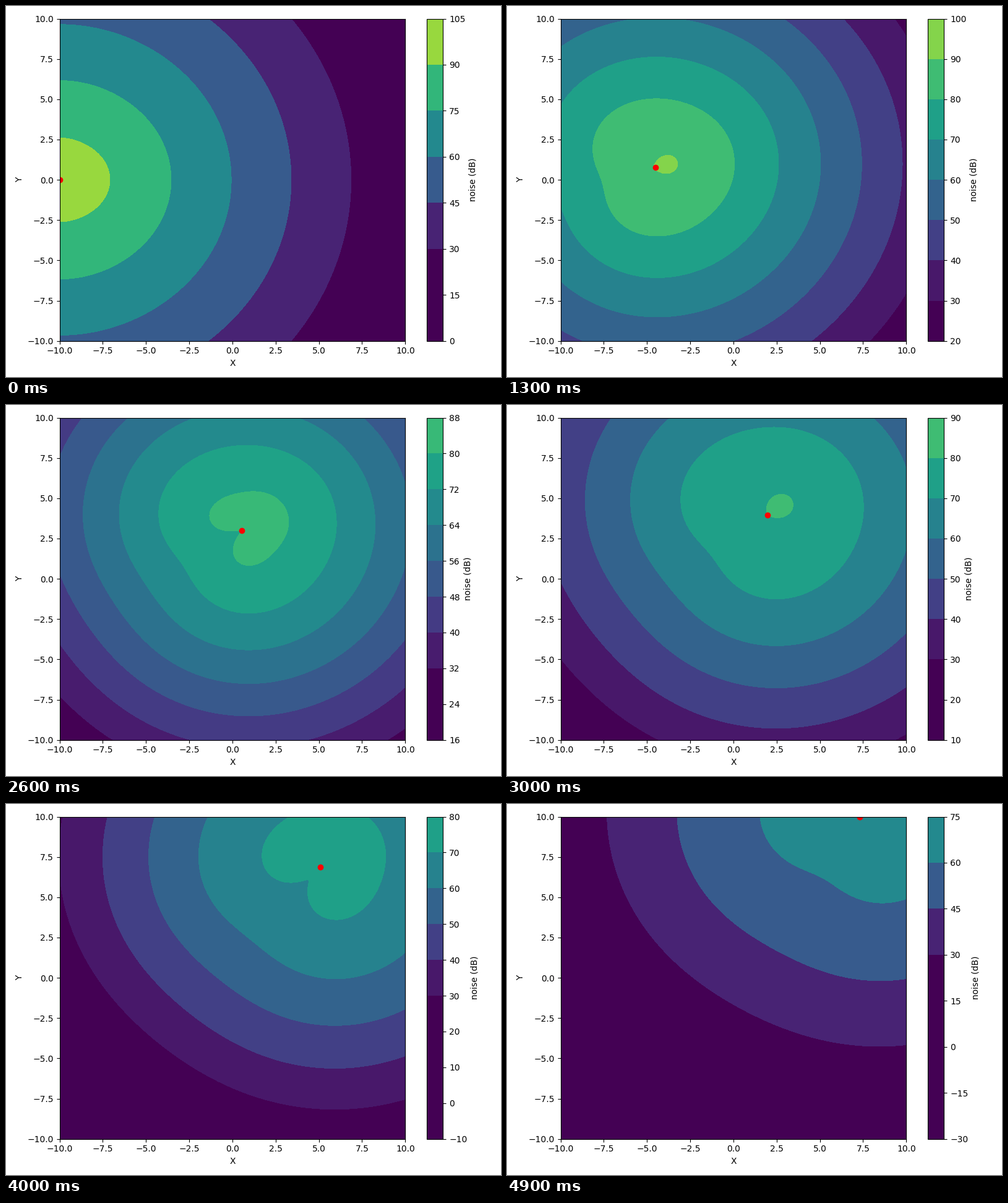
A matplotlib script that plays this animation: 800x600 px, repeating every 5000 ms.

```python
import numpy as np
import matplotlib.pyplot as plt
from matplotlib.animation import FuncAnimation

FRAMES, INTERVAL = 50, 100
WIDTH, HEIGHT, DPI = 800, 600, 100
MARGIN = 15                     # pixels between the layout and the right edge

RADIUS = 20
TURN = np.pi / 3
DECAY = 10 * np.log10(np.e)     # dB lost per unit of distance
SIDE_LEVEL = 102.1              # dB emitted at right angles to the heading

plt.rcParams["font.family"] = "DejaVu Sans"
axis = np.linspace(-10, 10, 301)
X, Y = np.meshgrid(axis, axis)
fig = plt.figure(figsize=(WIDTH / DPI, HEIGHT / DPI), dpi=DPI)


def flight(frame):
    """Position, height and heading on a climbing circular turn."""
    progress = frame / (FRAMES - 1)
    heading = TURN * progress
    x = -10 + RADIUS * np.sin(heading)
    y = RADIUS * (1 - np.cos(heading))
    return x, y, 1 + 6.7 * progress, heading


def directivity(cosine):
    ahead = np.clip(cosine, 0, 1)
    behind = np.clip(-cosine, 0, 1)
    return 1 + ahead ** 3.5 / 3 - 0.5665 * behind ** 3.2


def noise_level(x, y, height, heading):
    dx, dy = X - x, Y - y
    distance = np.sqrt(dx ** 2 + dy ** 2 + height ** 2)
    cosine = np.cos(np.arctan2(dy, dx) - heading)
    return SIDE_LEVEL + 10 * np.log10(directivity(cosine)) - DECAY * distance


def draw(frame):
    fig.clear()
    ax = fig.subplots()
    x, y, height, heading = flight(frame)
    bands = ax.contourf(X, Y, noise_level(x, y, height, heading),
                        cmap="viridis", vmin=30, vmax=110)
    ax.plot(x, y, "ro")
    ax.set(xlim=(-10, 10), ylim=(-10, 10), xlabel="X", ylabel="Y")

    fig.tight_layout()
    fig.subplots_adjust(right=1 - MARGIN / WIDTH)
    fig.colorbar(bands, ax=ax, label="noise (dB)")
    return []


animation = FuncAnimation(fig, draw, frames=FRAMES, interval=INTERVAL,
                          init_func=lambda: draw(0), repeat=True,
                          repeat_delay=0, blit=False)
plt.show()
```
